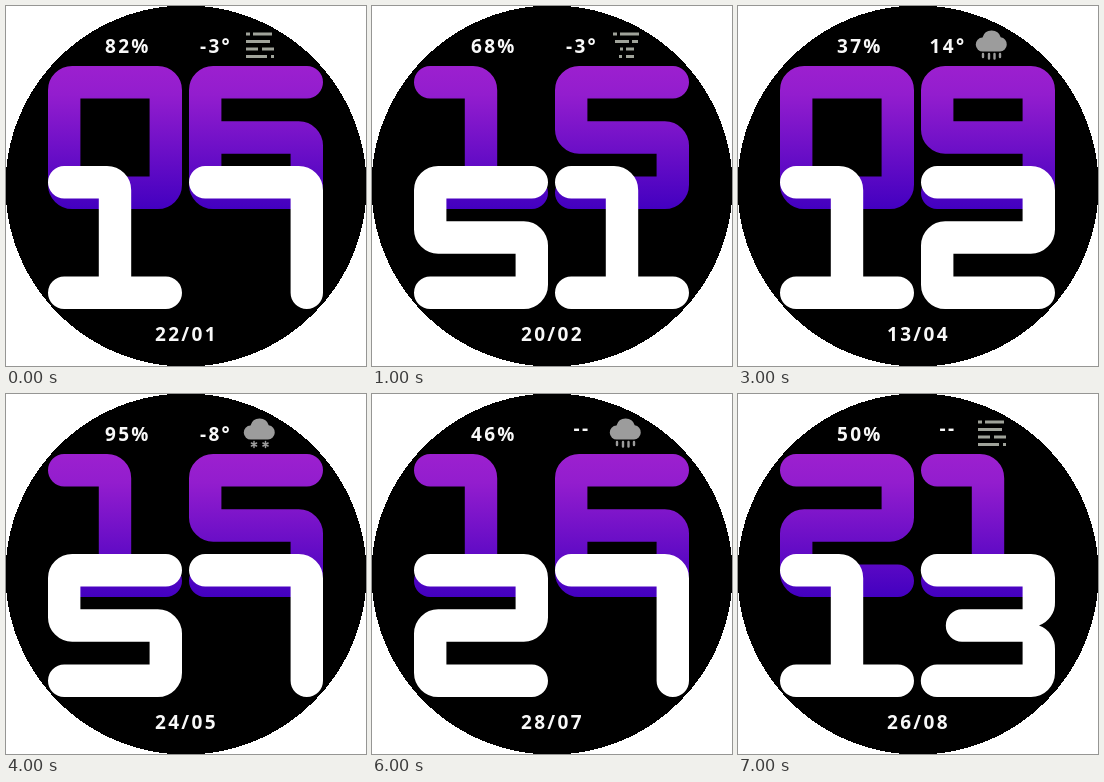
Recreate the animation shown at these times as an HTML page. Size 360 by 360 pixels, loop 8 s.

```html
<!DOCTYPE html>
<html lang="en">
<head>
<meta charset="utf-8">
<title>Watch face</title>
<style>
  html, body { margin: 0; width: 100%; height: 100%; overflow: hidden; background: #fff; }
  svg { display: block; width: 360px; height: 360px; }
  text { font: 600 19px "Noto Sans", "Open Sans", sans-serif; letter-spacing: 2.3px; fill: #f8f8f8; }
  .digit { fill: none; stroke-width: 32.4; stroke-linecap: round; }
  .lines { stroke: #a0a39a; stroke-width: 3; fill: none; }
  .cloud { fill: #9c9c9c; }
  .drops { stroke: #9c9c9c; stroke-width: 2.4; stroke-linecap: round; fill: none; }
  .flakes { stroke: #9c9c9c; stroke-width: 1.5; stroke-linecap: round; fill: none; }
</style>
</head>
<body>
<svg viewBox="0 0 360 360">
  <defs>
    <linearGradient id="violet" gradientUnits="userSpaceOnUse" x1="0" y1="0" x2="0" y2="143">
      <stop offset="0" stop-color="#9c20cf"/>
      <stop offset=".2" stop-color="#931dce"/>
      <stop offset="1" stop-color="#4300c0"/>
    </linearGradient>
    <path id="puff" d="M245 45.500a7 7 0 0 1-.5-14 9.500 9.500 0 0 1 18.200-.3 7.200 7.200 0 0 1-.7 14.300Z"/>
    <path id="flake" d="M0-3V3M-2.600-1.500 2.600 1.500M-2.600 1.500 2.600-1.500"/>
  </defs>
  <circle cx="180" cy="180" r="180.6" shape-rendering="crispEdges"/>
  <g id="hours"></g>
  <g id="minutes"></g>
  <text id="battery" x="99" y="47"></text>
  <text id="temp" x="210" y="47" text-anchor="middle"></text>
  <text id="date" x="149" y="335"></text>
  <g id="icons">
    <g id="fog" class="lines">
      <path d="M240 28h4m3 0h19M240 35.500h24M240 43h12m4 0h12M240 50.500h21m4 0h3"/>
    </g>
    <g id="tornado" class="lines">
      <path d="M241 28h4m3 0h19M243 35.500h14m3 0h6M248 43h3m3 0h8M247 50.500h3m4 0h8"/>
    </g>
    <g id="sleet" class="cloud">
      <path class="drops" d="M240 37a7 7 0 0 1 3-8 9 9 0 0 1 13-4"/>
      <use href="#puff" transform="translate(22.500 5.500) scale(.92)"/>
      <circle cx="247" cy="49.500" r="1.500"/>
      <circle cx="253.500" cy="51" r="2.300"/>
      <circle cx="260" cy="49.500" r="1.500"/>
    </g>
    <g id="snow">
      <use class="cloud" href="#puff"/>
      <g class="flakes">
        <use href="#flake" x="248" y="50.500"/>
        <use href="#flake" x="259.500" y="50.500"/>
      </g>
    </g>
    <g id="rain">
      <use class="cloud" href="#puff"/>
      <path class="drops" d="M245 48v3M251 48v4.500M256.500 48v4.500M262 48v3"/>
    </g>
  </g>
</svg>
<script>
const STEP = 1000;
const L = 16.2, R = 117.8, T = 16.2, M = 71.5, B = 126.8;

// Centre line with softly rounded corners.
function line(...pts) {
  const bend = 8;
  const toward = (a, b) => {
    const d = Math.hypot(b[0] - a[0], b[1] - a[1]);
    return a.map((v, i) => v + (b[i] - v) * bend / d);
  };
  return pts.map((p, i) => {
    if (!i) return "M" + p;
    if (i === pts.length - 1) return "L" + p;
    const from = toward(p, pts[i - 1]), to = toward(p, pts[i + 1]);
    const turn = (p[0] - from[0]) * (to[1] - p[1]) - (p[1] - from[1]) * (to[0] - p[0]);
    return `L${from}A${bend} ${bend} 0 0 ${turn > 0 ? 1 : 0} ${to}`;
  }).join("");
}

const strokes = {
  0: line([67, T], [R, T], [R, B], [L, B], [L, T], [67, T]),
  1: line([L, T], [67, T], [67, B]) + line([L, B], [R, B]),
  2: line([L, T], [R, T], [R, M], [L, M], [L, B], [R, B]),
  4: line([L, T], [L, M], [R, M]) + line([R, T], [R, B]),
  5: line([R, T], [L, T], [L, M], [R, M], [R, B], [L, B]),
  6: line([R, T], [L, T], [L, B], [R, B], [R, M], [L, M]),
  7: line([L, T], [R, T], [R, B]),
  9: line([L, B], [R, B], [R, T], [L, T], [L, M], [R, M])
};

// Digits pinched at the waist are filled outlines.
const arc = (x, y, r = 24) => `A${r} ${r} 0 0 1 ${x} ${y}`;
const rightSide = "H110" + arc(134, 24) + "V48" + arc(118, M) + arc(134, 95) + "V119" + arc(110, 143);
const fills = {
  3: "M16 0" + rightSide + "H16" + arc(16, 110.6, 16.2) + "H101.6V87.7H41" + arc(41, 55.3, 16.2) +
     "H101.6V32.4H16" + arc(16, 0, 16.2) + "Z",
  8: "M24 0" + rightSide + "H24" + arc(0, 119) + "V95" + arc(16, M) + arc(0, 48) + "V24" + arc(24, 0) +
     "ZM32.4 32.4V55.3H101.6V32.4ZM32.4 87.7V110.6H101.6V87.7Z"
};

const scenes = [
  ["06", "17", "82%", "-3°", "fog", "22/01"],
  ["15", "51", "68%", "-3°", "tornado", "20/02"],
  ["04", "18", "5%", "32°", "sleet", "06/03"],
  ["09", "12", "37%", "14°", "rain", "13/04"],
  ["15", "57", "95%", "-8°", "snow", "24/05"],
  ["20", "36", "71%", "21°", "rain", "17/06"],
  ["16", "27", "46%", "--", "rain", "28/07"],
  ["21", "13", "50%", "--", "fog", "26/08"]
];

const el = id => document.getElementById(id);

function number(id, value, y, paint) {
  el(id).innerHTML = [...value].map((n, i) => {
    const place = `transform="translate(${42 + i * 141} ${y})"`;
    return fills[n]
      ? `<path d="${fills[n]}" fill="${paint}" ${place}/>`
      : `<path class="digit" d="${strokes[n]}" stroke="${paint}" ${place}/>`;
  }).join("");
}

function show([hours, minutes, battery, temp, icon, date]) {
  number("hours", hours, 60, "url(#violet)");
  number("minutes", minutes, 160, "#fff");
  el("battery").textContent = battery;
  el("temp").textContent = temp;
  el("temp").setAttribute("y", temp === "--" ? 41 : 47);
  el("date").textContent = date;
  for (const g of el("icons").children) g.style.display = g.id === icon ? "" : "none";
}

let current = -1;
const start = performance.now();
function tick() {
  const i = Math.floor((performance.now() - start) / STEP) % scenes.length;
  if (i !== current) show(scenes[current = i]);
  requestAnimationFrame(tick);
}
tick();
</script>
</body>
</html>
```
